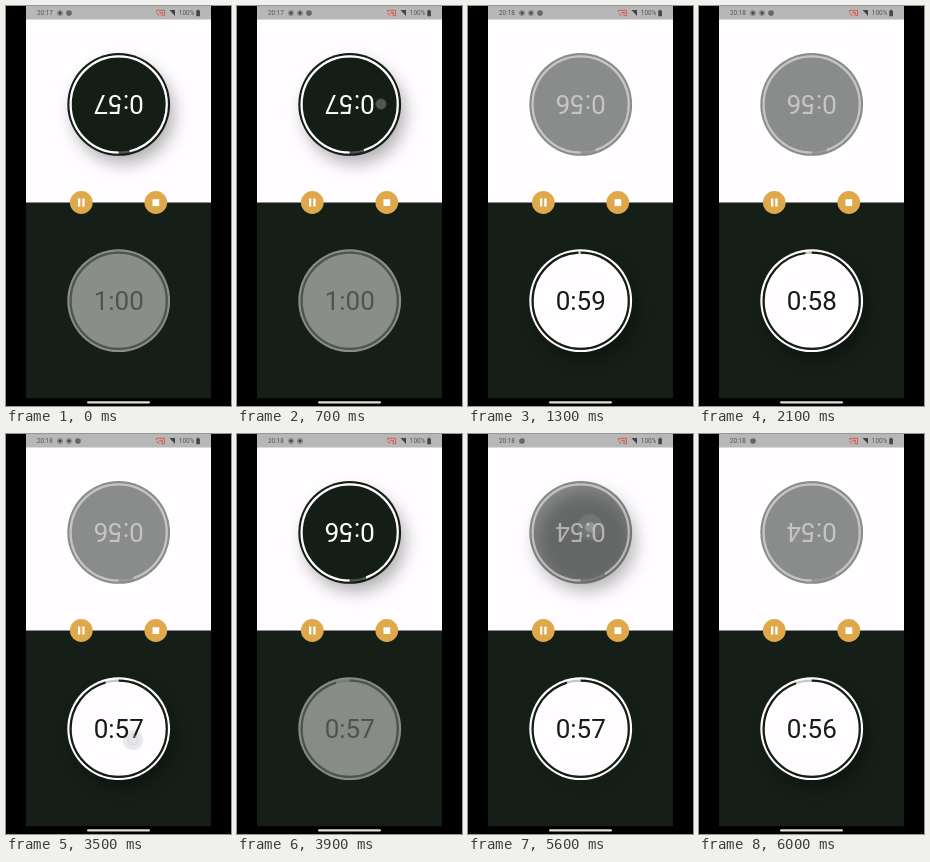
Animation of 225 by 400 pixels, one loop 6.1 s. Source, as an HTML page:

```html
<!DOCTYPE html>
<html>
<head>
<meta charset="utf-8">
<style>
html, body { margin: 0; height: 100%; overflow: hidden; background: #000; }
svg { display: block; width: 100vw; height: 100vh; }
text { font-family: Roboto, sans-serif; }
.digits { font-size: 26px; text-anchor: middle; }
.status { font-size: 6.4px; fill: #555; }
</style>
</head>
<body>
<svg viewBox="0 0 225 400">
  <defs>
    <filter id="blur" x="-50%" y="-50%" width="200%" height="200%"><feGaussianBlur stdDeviation="9"/></filter>
    <clipPath id="disc"><circle r="51.4"/></clipPath>
    <clipPath id="screen"><rect x="20" width="185" height="392.5"/></clipPath>
  </defs>
  <g clip-path="url(#screen)">
    <rect x="20" width="185" height="197" fill="#fffdff"/>
    <rect x="20" y="196.5" width="185" height="196" fill="#151e17"/>
    <g id="timers"></g>
    <rect x="20" width="185" height="13.5" fill="#b7b7b7"/>
  </g>
  <text id="clock" class="status" x="31" y="9.3"></text>
  <g id="icons"></g>
  <g fill="none" stroke="#d9534a" stroke-width=".9">
    <path d="M150.5 6V4.300H158.500V9.700H155.500M150.500 7.500a2.300 2.300 0 0 1 2.300 2.300"/>
    <path d="M153 6.300h3.500v1.700h-2"/>
  </g>
  <path d="M163.500 4h5.500v6z" fill="#444"/>
  <text class="status" x="172.800" y="9.300">100%</text>
  <path d="M190.300 4.500h1v-.8h1.600v.8h1v5.700h-3.600z" fill="#444"/>
  <g fill="#dfa94b">
    <circle cx="75.300" cy="196.500" r="11.400"/>
    <circle cx="149.800" cy="196.500" r="11.400"/>
  </g>
  <path d="M72 192.600h2.300v7.800h-2.300zM76.300 192.600h2.300v7.800h-2.300zM146.500 193.200h6.700v6.700h-6.700z" fill="#fff"/>
  <rect x="81" y="395.300" width="63" height="2.300" rx="1.150" fill="#ddd"/>
</svg>
<script>
const LOOP = 6100, FADE = 200;
const DARK = '#141d16', LIGHT = '#fffdff';
const $ = id => document.getElementById(id);
const clamp = v => Math.max(0, Math.min(1, v));

// Each tap hands the turn to the other player.
const taps = [
  { down: 700, up: 840, x: 144, y: 98, timer: 0 },
  { down: 3470, up: 3600, x: 127, y: 306, timer: 1 },
  { down: 5562, up: 5580, x: 122, y: 93, timer: 0 }
];
const [first, second, third] = taps.map(tap => tap.up);

const timers = [
  { y: 98.4, turn: 180, fill: DARK, ink: LIGHT, start: 57.8, runs: [[-FADE, first], [second, third]] },
  { y: 294.7, turn: 0, fill: LIGHT, ink: DARK, start: 60, runs: [[first, second], [third, LOOP + FADE]] }
];

for (const timer of timers) {
  const ring = `r="48.1" fill="none" stroke="${timer.ink}" stroke-width="2.2"`;
  $('timers').insertAdjacentHTML('beforeend', `
    <g transform="translate(112.700 ${timer.y})">
      <circle class="shadow" cx="5" cy="9" r="50" filter="url(#blur)"/>
      <circle class="face" r="51.4" fill="${timer.fill}"/>
      <g class="content" transform="rotate(${timer.turn})">
        <circle ${ring} opacity=".25"/>
        <circle class="ring" ${ring} pathLength="60" transform="rotate(-90)"/>
        <text class="digits" y="9.2" fill="${timer.ink}"></text>
      </g>
      <g clip-path="url(#disc)"><circle class="ripple" fill="${timer.ink}"/></g>
      <circle class="touch" fill="#ddd" stroke="#999" stroke-width=".7"/>
    </g>`);
  timer.node = $('timers').lastElementChild;
}

function set(node, name, attrs) {
  const part = node.querySelector('.' + name);
  for (const key in attrs) part.setAttribute(key, attrs[key]);
  return part;
}

function drawTimer(timer, index, t) {
  const { node, runs } = timer;
  const active = runs.some(([from, to]) => t >= from && t < to);
  const used = runs.reduce((sum, [from, to]) => sum + Math.max(0, Math.min(t, to) - Math.max(0, from)), 0);
  const left = timer.start - used / 1000;
  const shadow = Math.max(...runs.map(([from, to]) => Math.min(clamp((t - from) / FADE), 1 - clamp((t - to) / FADE))));
  const seconds = Math.floor(left);

  set(node, 'shadow', { opacity: shadow * 0.32 });
  set(node, 'face', { opacity: active ? 1 : 0.5 });
  set(node, 'content', { opacity: active ? 1 : 0.5 });
  set(node, 'ring', { 'stroke-dasharray': `${left} 60` });
  set(node, 'digits', {}).textContent = `${Math.floor(seconds / 60)}:${String(seconds % 60).padStart(2, '0')}`;

  const tap = taps.find(tap => tap.timer === index && t >= tap.down && t < tap.up + 350);
  const at = tap ? { cx: tap.x - 112.7, cy: tap.y - timer.y } : {};
  set(node, 'ripple', {
    ...at,
    r: tap ? Math.min(115, (t - tap.down) * 0.33) : 0,
    opacity: tap ? 0.09 * (1 - clamp((t - tap.up - 50) / 300)) : 0
  });
  set(node, 'touch', { ...at, r: 5.3, opacity: tap && t < tap.up + 80 ? 0.3 : 0 });
}

function drawIcons(t) {
  const icons = t < 400 ? 'do' : t < 3800 ? 'ddo' : t < 5300 ? 'dd' : 'o';
  $('icons').innerHTML = [...icons].map((kind, i) => {
    const at = `cx="${54 + 9 * i}" cy="7"`;
    return kind === 'd'
      ? `<circle ${at} r="2.700" fill="none" stroke="#777" stroke-width=".7"/><circle ${at} r="1.700" fill="#444"/>`
      : `<circle ${at} r="2.800" fill="#666"/>`;
  }).join('');
}

function frame(now) {
  const t = now % LOOP;
  $('clock').textContent = t < 800 ? '20:17' : '20:18';
  drawIcons(t);
  timers.forEach((timer, i) => drawTimer(timer, i, t));
  requestAnimationFrame(frame);
}
frame(0);
</script>
</body>
</html>
```
